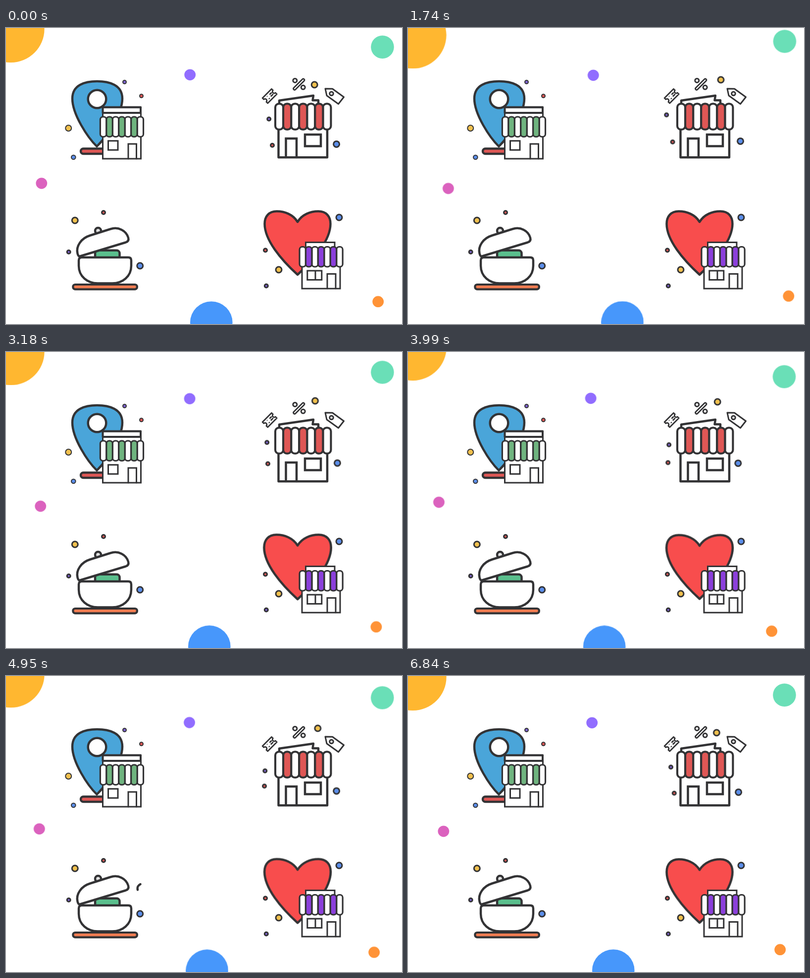
Write an HTML page that moves like this. It is 800x600 px and loops after 6870 ms.

```html
<!DOCTYPE html>
<html lang="en">
<head>
<meta charset="utf-8">
<title>Shop icons</title>
<style>
html, body { margin: 0; width: 100%; height: 100%; overflow: hidden; background: #fff; }
svg { display: block; width: 800px; height: 600px; }

.ink { stroke: #333335; fill: #fff; stroke-width: 3; stroke-linejoin: round; stroke-linecap: round; }
.bold { stroke-width: 4.5; }
.thin { stroke-width: 2; }
.none { fill: none; }
.yellow { fill: #f0c04d; }
.blue { fill: #5b8eea; }
.red { fill: #dd5755; }
.purple { fill: #7d62cf; }

.float, .dot, .heart, .ripple, .steam { animation: 6870ms linear infinite; }

/* Large circles drift to one side, back through the middle, then settle. */
.float { animation-name: drift; }
@keyframes drift {
  0% { transform: none; animation-timing-function: cubic-bezier(.33, 0, .83, .83); }
  26.7% { transform: translate(calc(var(--x) * 1.054), calc(var(--y) * 1.054)); }
  58.2% {
    transform: translate(calc(var(--x) * -.99), calc(var(--y) * -.99));
    animation-timing-function: cubic-bezier(.17, .17, .45, 1);
  }
  100% { transform: none; }
}

/* Small dots wander along five stops of their own. */
.dot { animation-name: wander; }
@keyframes wander {
  0%, 100% { transform: translate(0, 0); }
  25.33% { transform: translate(var(--a)); }
  46.29% { transform: translate(var(--b)); }
  58.08% { transform: translate(var(--c)); }
  72.05% { transform: translate(var(--d)); }
  85.59% { transform: translate(var(--e)); }
}

.heart, .ripple { transform-box: fill-box; transform-origin: center; }
.heart { animation-name: pulse; }
@keyframes pulse {
  0%, 27%, 85%, 100% { transform: scale(1); }
  46.3% { transform: scale(1.017); }
  58%, 72% { transform: scale(1.006); }
}

.ripple { animation-name: spread; opacity: 0; }
@keyframes spread {
  0%, 79% { transform: scale(1); opacity: 0; }
  79.1% { transform: scale(1); opacity: .45; }
  85.6% { transform: scale(1.66, 1.3); opacity: .12; }
  88%, 100% { transform: scale(1.85, 1.4); opacity: 0; }
}

.steam { stroke-dasharray: 100 120; stroke-dashoffset: 110; }
.right { animation-name: steam-right; }
.left { animation-name: steam-left; }
@keyframes steam-right {
  0%, 67% { stroke-dashoffset: 110; }
  72.05% { stroke-dashoffset: 0; }
  77%, 100% { stroke-dashoffset: -110; }
}
@keyframes steam-left {
  0%, 81% { stroke-dashoffset: 110; }
  85.6% { stroke-dashoffset: 0; }
  90%, 100% { stroke-dashoffset: -110; }
}
</style>
</head>
<body>
<svg viewBox="0 0 800 600">
  <defs>
    <rect id="pill" width="12.45" height="40.5" rx="5.6"/>
    <g id="awning" stroke="#333335" stroke-width="3.2">
      <g fill="#fff">
        <use href="#pill"/>
        <use href="#pill" x="24.9"/>
        <use href="#pill" x="49.8"/>
        <use href="#pill" x="74.7"/>
      </g>
      <g fill="currentColor">
        <use href="#pill" x="12.45"/>
        <use href="#pill" x="37.35"/>
        <use href="#pill" x="62.25"/>
      </g>
    </g>
  </defs>

  <!-- Background circles -->
  <circle class="float" cx="9.6" cy="2" r="68" fill="#ffb730" style="--x:-.2px;--y:12.5px"/>
  <circle class="float" cx="760.5" cy="38.6" r="23.3" fill="#6adfb7" style="--x:.5px;--y:-11.6px"/>
  <circle class="float" cx="371.7" cy="94.8" r="11.4" fill="#916dff" style="--x:2.6px;--y:1px"/>
  <circle class="float" cx="71.8" cy="314.8" r="11.4" fill="#db62be" style="--x:9.6px;--y:10.5px"/>
  <circle class="float" cx="414.8" cy="597" r="42.8" fill="#4797fb" style="--x:18.5px;--y:-.5px"/>
  <circle class="float" cx="751.7" cy="554.7" r="11.4" fill="#ff9337" style="--x:17.3px;--y:-11.4px"/>

  <!-- Shop with map pin -->
  <g class="ink">
    <rect class="ripple red" stroke="none" x="149" y="242.3" width="70" height="14.6" rx="7.3"/>
    <rect class="bold red" x="151" y="244.5" width="66" height="10.4" rx="5.2"/>
    <path class="bold" fill="#4aa5d9" style="fill:#4aa5d9" d="M183.5 240C165 222 134 175 134 143C134 115 160 108 184 108S235 115 235 143C235 175 202 222 183.5 240Z"/>
    <circle class="bold" cx="184" cy="144" r="18.3"/>
    <rect x="195.5" y="161" width="77" height="104" stroke-linejoin="miter"/>
    <path class="none" stroke-width="4" style="stroke-width:4" d="M195.5 160.5H272V172H195.5Z"/>
    <use href="#awning" x="190.4" y="180" color="#6fb47f"/>
    <path class="none" style="stroke-linejoin:miter" d="M206.5 228.7H226V247.2H206.5ZM247 265V235H263.5V265"/>
    <g class="thin">
      <circle class="purple" cx="239.5" cy="109.5" r="3.5"/>
      <circle class="red" cx="273.5" cy="137.8" r="3.5"/>
      <circle class="yellow" cx="126.2" cy="203" r="6"/>
      <circle class="blue" cx="136.3" cy="262" r="4.3"/>
    </g>
  </g>

  <!-- Shop with offers -->
  <g class="ink">
    <path class="bold" d="M552 158V147L621 137L619.5 146.5H631V158"/>
    <path class="bold" d="M550.5 190H649V262.2H550.5Z"/>
    <use href="#awning" transform="translate(544 153.5) scale(1.29)" color="#df5755"/>
    <path class="bold none" style="stroke-linejoin:miter" d="M565.5 262V224H587V262M604 216H636V239.5H604Z"/>
    <path style="stroke-width:7.5" d="M583 123L600.5 105.5"/>
    <path style="stroke:#fff;stroke-width:2" d="M583 123L600.5 105.5"/>
    <circle cx="583.8" cy="106.4" r="4"/>
    <circle cx="600.2" cy="120.3" r="4"/>
    <g transform="translate(532.6 138) rotate(-45)" style="stroke-width:2.8">
      <path d="M-13 -7.5H13V-3.5A3.5 3.5 0 0 0 13 3.5V7.5H-13V3.5A3.5 3.5 0 0 0 -13 -3.5Z"/>
      <path class="none" stroke-linecap="butt" d="M-4 -3.5V-2.5M-4 2V4M2 -2.2H8M1 2.2H8"/>
    </g>
    <path d="M645 123L659.5 123.3L682.5 140L671.5 154L648 137Z"/>
    <circle cx="657.5" cy="133" r="3.8"/>
    <circle class="dot yellow" cx="623.2" cy="115" r="6" style="--a:8.8px,-10px;--b:1.3px,-16px;--c:2px,-14px;--d:6.6px,-9px;--e:7.5px,-2.5px"/>
    <circle class="dot purple" cx="531.2" cy="184.5" r="3.5" style="--a:-9px,-8.4px;--b:-4px,-1.2px;--c:-4px,3.5px;--d:-8px,7.8px;--e:-6px,5.7px"/>
    <circle class="dot red" cx="538" cy="237.8" r="3.5" style="--a:-3.4px,-6.8px;--b:-9px,-11.3px;--c:-12.8px,-13.5px;--d:-16px,-14.6px;--e:-8.4px,-7.8px"/>
    <circle class="dot blue" cx="667.6" cy="235.4" r="6" style="--a:3.9px,-6px;--b:1.8px,-10.4px;--c:-.8px,-10px;--d:0px,-2.4px;--e:.5px,2.1px"/>
  </g>

  <!-- Cooking pot -->
  <g class="ink">
    <rect x="135.3" y="520" width="129.6" height="9.6" rx="4.5" style="fill:#f37d52;stroke-width:4.2"/>
    <rect class="bold" x="180" y="450.8" width="49.5" height="18" rx="6" style="fill:#5abf8d"/>
    <path class="bold" d="M153 465H247Q253 465 253 471V482C253 504 235 517.5 215 517.5H185C165 517.5 147 504 147 482V471Q147 465 153 465Z"/>
    <circle class="bold" cx="186" cy="411" r="6" style="fill:#e2e2e2"/>
    <path class="bold" d="M150 462.5L242 434.5Q249 432 247 425C243 411 227 402 211 407.5L170 420.5C152 426 141 442 144.5 457Q146 464 150 462.5Z"/>
    <path class="steam right bold none" pathLength="100" d="M266 433.5C264.5 428 267.5 424 271.5 422"/>
    <path class="steam left bold none" pathLength="100" d="M257.7 422C256.2 425.5 257 428 259.5 430"/>
    <circle class="yellow" cx="139.3" cy="390" r="6"/>
    <circle class="red" cx="197" cy="374" r="3.5"/>
    <circle class="purple" cx="126.7" cy="454" r="3.5"/>
    <circle class="blue" cx="270.7" cy="482" r="6"/>
  </g>

  <!-- Shop with heart -->
  <g class="ink">
    <path class="heart bold" style="fill:#f84d4d" d="M589 393C580 378 563 371.5 547 371.5C531 371.5 522.5 382 522.5 397C522.5 430 556 470 589 500C622 470 655.5 430 655.5 397C655.5 382 647 371.5 631 371.5C615 371.5 598 378 589 393Z"/>
    <path style="stroke-linejoin:miter" d="M605.5 434.5H664V460H605.5ZM598 470H675V528.3H598Z"/>
    <use href="#awning" x="593" y="443.5" color="#8b3fdb"/>
    <path class="none" style="stroke-linejoin:miter" d="M608.8 492H637.8V510.5H608.8ZM625 492V510.5M649 528V498.5H666V528"/>
    <circle class="blue" cx="673" cy="384" r="6"/>
    <circle class="red" cx="524" cy="450.5" r="3.5"/>
    <circle class="yellow" cx="551" cy="490" r="6"/>
    <circle class="purple" cx="525.8" cy="522.8" r="3.5"/>
  </g>
</svg>
</body>
</html>
```
